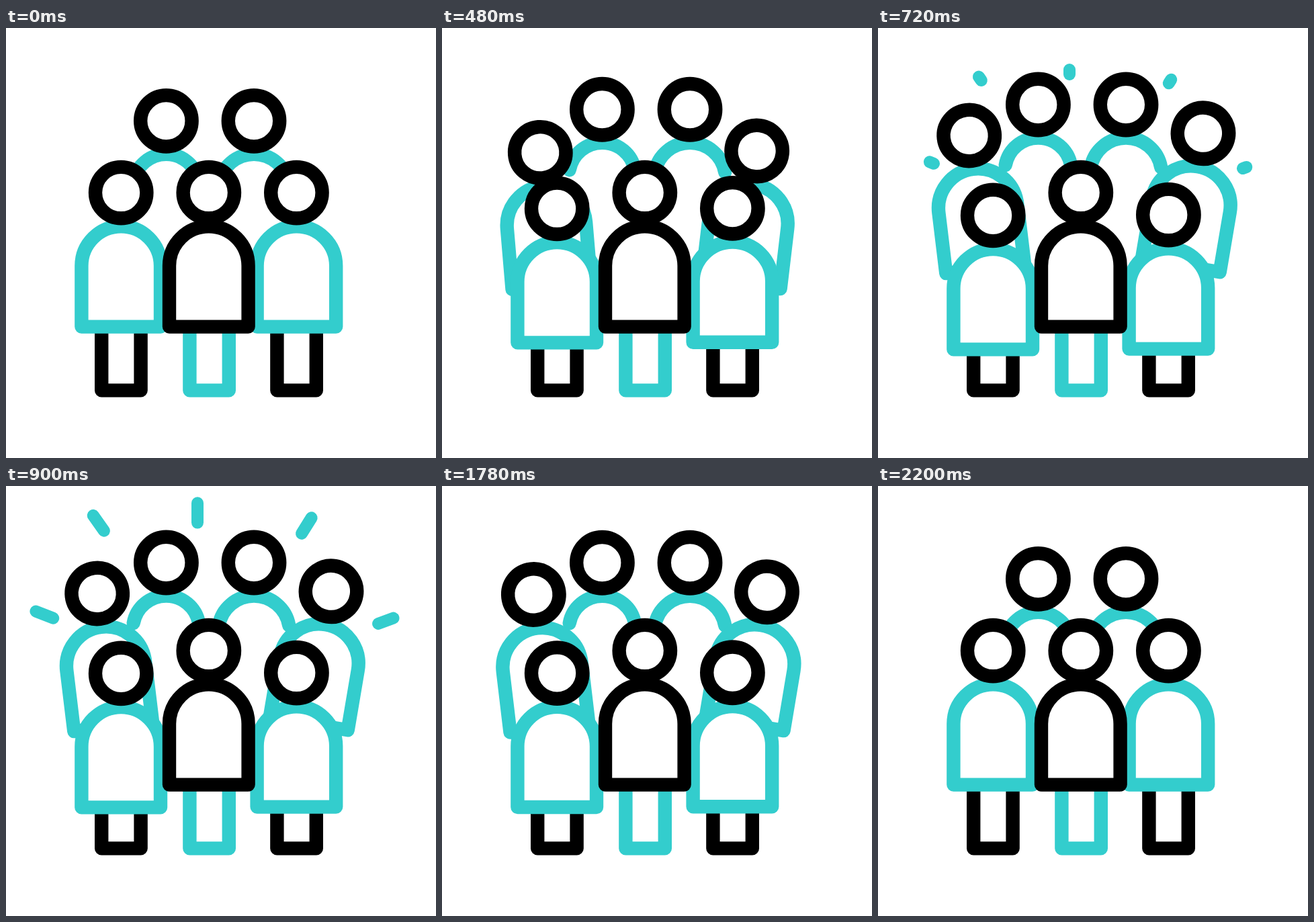
Animation of 640x640 px, one loop 2.56 s. Source, as an HTML page:

```html
<!DOCTYPE html>
<html lang="en">
<head>
<meta charset="utf-8">
<title>Growing crowd</title>
<style>
  html, body { margin: 0; height: 100%; overflow: hidden; background: #fff; }
  svg { display: block; width: 100vw; height: 100vh; }
  g { fill: #fff; stroke-width: 20.4; stroke-linejoin: round; stroke-linecap: round; }
  .ink { stroke: #000; }
  .teal { stroke: #33cdcd; }
  .open { fill: none; }
  .spark { stroke-width: 18; }
</style>
</head>
<body>
<svg id="stage" viewBox="0 0 640 640"></svg>
<script>
const LOOP = 2560;
const stage = document.getElementById('stage');

// Each person is drawn around the centre of the head.
const head = (cls = '') => `<circle class="ink ${cls}" r="38.2"/>`;
const body = color =>
  `<path class="${color}" d="M-58.8 199.5V109a58.8 58.8 0 0 1 117.6 0V199.5Z"/>`;
const legs = (x, color) =>
  `<path class="${color}" d="M${x - 29.2} 400V539.4H${x + 29.2}V400"/>`;
const shoulders = r => {
  const x = Math.sqrt(r * r - 81);
  return `<path class="teal open" d="M${-x} ${40.5 + r}A${r} ${r} 0 0 1 ${x} ${40.5 + r}"/>`;
};

function add(content) {
  const group = document.createElementNS('http://www.w3.org/2000/svg', 'g');
  group.innerHTML = content;
  stage.append(group);
  return group;
}

// Moves from (x, y) by (dx, dy) while leaning by `turn` degrees.
function person(content, x, y, dx = 0, dy = 0, turn = 0, close = [1755, 2195]) {
  return { node: add(content), x, y, dx, dy, turn, close };
}

const people = [
  person(shoulders(49.5) + head(), 238.4, 138.3, 0, -24.3),
  person(shoulders(53) + head(), 369, 138.3, 0, -24.3),
  person(body('teal') + head('open'), 171.3, 245.1, -35.6, -85.1, -6.9, [1750, 2140]),
  person(body('teal') + head('open'), 432.4, 245.1, 51.6, -88.3, 9.6)
];
add(legs(171.4, 'ink') + legs(302.6, 'teal') + legs(432.6, 'ink'));
people.push(
  person(body('teal') + head(), 171.2, 245.1, 0, 33.8),
  person(body('teal') + head(), 432.4, 245.1, 0, 33),
  person(body('ink') + head(), 301.8, 245.1)
);

// Start point and travel of each spark.
const sparks = [
  [83, 201.8, -53, -21],
  [153.8, 78, -33, -47],
  [285, 69, 0, -60],
  [432.8, 82.3, 30, -48],
  [543, 209, 46, -17]
].map(line => ({ line, node: add('<path class="teal spark"/>').firstChild }));

function ease(time, start, end) {
  const t = Math.min(1, Math.max(0, (time - start) / (end - start)));
  return t * t * (3 - 2 * t);
}

function draw(time) {
  for (const { node, x, y, dx, dy, turn, close } of people) {
    const p = ease(time, 200, 640) - ease(time, ...close);
    node.setAttribute('transform',
      `translate(${x + dx * p} ${y + dy * p}) rotate(${turn * p})`);
    if (turn) node.style.display = p > 0 ? '' : 'none';
  }
  const tip = ease(time, 635, 1040);
  const tail = ease(time, 770, 1180);
  for (const { node, line: [x, y, dx, dy] } of sparks) {
    node.style.display = tip > tail ? '' : 'none';
    node.setAttribute('d',
      `M${x + dx * tail} ${y + dy * tail}L${x + dx * tip} ${y + dy * tip}`);
  }
}

const began = performance.now();
function tick() {
  draw((performance.now() - began) % LOOP);
  requestAnimationFrame(tick);
}
tick();
</script>
</body>
</html>
```
